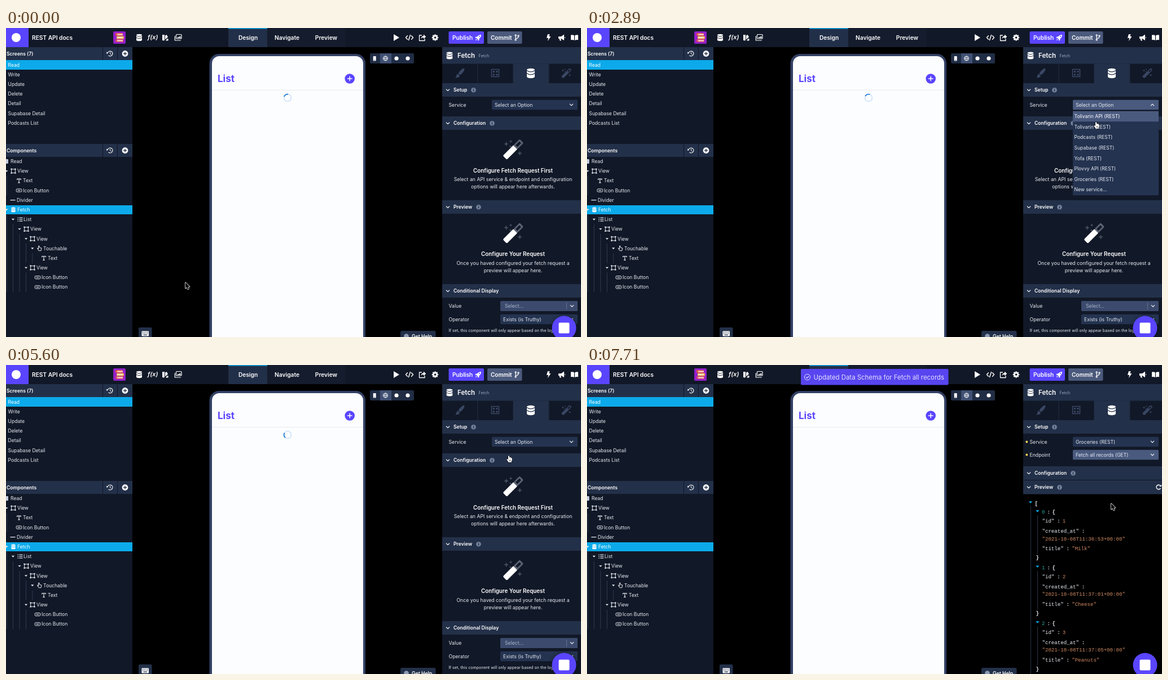
Write an HTML page with a canvas that moves like this. It is 1019 by 549 pixels and loops after 8 s.

```html
<!DOCTYPE html>
<html lang="en">
<head>
<meta charset="utf-8">
<title>REST API docs</title>
<style>
html, body { margin: 0; width: 100%; height: 100%; overflow: hidden; background: #000; }
canvas { display: block; width: 1019px; height: 549px; }
</style>
</head>
<body>
<canvas id="stage"></canvas>
<script>
const W = 1019, H = 549, LOOP = 8000;
const canvas = document.getElementById('stage');
const g = canvas.getContext('2d');
const dpr = window.devicePixelRatio || 1;
canvas.width = W * dpr;
canvas.height = H * dpr;

const C = {
  panel: '#111827', head: '#233049', field: '#243350', hover: '#4a5a7f', sky: '#0caaea',
  purple: '#5a45ff', white: '#ffffff', text: '#e8ecf3', dim: '#3a4764', info: '#73819c', line: '#0e1524'
};

// Drawing helpers
function rect(x, y, w, h, color, r = 0) {
  g.fillStyle = color;
  g.beginPath();
  g.roundRect(x, y, w, h, r);
  g.fill();
}
function box(x, y, w, h, color, lw = 1, r = 0) {
  g.strokeStyle = color;
  g.lineWidth = lw;
  g.beginPath();
  g.roundRect(x, y, w, h, r);
  g.stroke();
}
function disc(x, y, r, color) {
  g.fillStyle = color;
  g.beginPath();
  g.arc(x, y, r, 0, 7);
  g.fill();
}
function arc(x, y, r, from, to, color, lw = 1) {
  g.strokeStyle = color;
  g.lineWidth = lw;
  g.beginPath();
  g.arc(x, y, r, from, to);
  g.stroke();
}
function path(d, x, y, fill, stroke, lw = 1) {
  const p = new Path2D(d);
  g.save();
  g.translate(x, y);
  g.lineJoin = g.lineCap = 'round';
  if (stroke) { g.strokeStyle = stroke; g.lineWidth = lw; g.stroke(p); }
  if (fill) { g.fillStyle = fill; g.fill(p); }
  g.restore();
}
function text(s, x, y, size = 8.7, color = C.text, weight = 400, align = 'left', family = 'Inter, sans-serif') {
  g.font = `${weight} ${size}px ${family}`;
  g.textAlign = align;
  g.fillStyle = color;
  g.fillText(s, x, y + size * 0.36);
}
const bold = (s, x, y, size = 8.6, align) => text(s, x, y, size, C.white, 600, align);
const plus = (x, y, r, color, lw) => path(`M${-r} 0H${r}M0 ${-r}V${r}`, x, y, null, color, lw);
const chevron = (x, y, up) => path(up ? 'M-2.7 1.3L0-1.4L2.7 1.3' : 'M-2.7-1.3L0 1.4L2.7-1.3', x, y, null, C.white, 1.1);

function database(x, y, s, color, gap) {
  g.save();
  g.translate(x, y);
  g.scale(s, s);
  rect(-5, -4.5, 10, 9, color);
  g.fillStyle = color;
  for (const cy of [-4.3, 4.3]) {
    g.beginPath();
    g.ellipse(0, cy, 5, 1.9, 0, 0, 7);
    g.fill();
  }
  for (const cy of [-3.6, 0]) path('M-5 0Q0 3.4 5 0', 0, cy, null, gap, 0.9);
  g.restore();
}

function wand(x, y, s, tip, handle, star, hole) {
  g.save();
  g.translate(x, y);
  g.scale(s, s);
  for (const [sx, sy, r] of [[-12, -10, 4.4], [-4, -14.5, 3], [12, 6.5, 4.4], [-4.5, -5.5, 2.6]])
    path(`M0 ${-r}L${r * .3} ${-r * .3}L${r} 0L${r * .3} ${r * .3}L0 ${r}L${-r * .3} ${r * .3}L${-r} 0L${-r * .3} ${-r * .3}Z`, sx, sy, star);
  g.rotate(-Math.PI / 4);
  rect(-20.5, -5, 27, 10, handle, 2);
  rect(5.5, -5, 16, 10, tip, 2);
  rect(8.5, -2.2, 9.8, 4.4, hole, 0.5);
  g.restore();
}

function infoIcon(x, y) {
  disc(x, y, 4.3, C.info);
  rect(x - .6, y - .7, 1.2, 3, C.panel);
  rect(x - .6, y - 2.5, 1.2, 1.2, C.panel);
}

// Top bar
function topBar() {
  rect(0, 0, W, 34, C.panel);
  rect(0, 0, 40, 34, C.purple);
  disc(18, 17, 8, C.white);
  bold('REST API docs', 46, 17, 10.2);

  rect(190, 6, 22, 22, '#9320cc', 2);
  rect(194, 9, 13, 5, '#e2574c', 1);
  rect(196, 14.5, 13, 5, '#f0b64a', 1);
  rect(194, 20, 14, 5, '#d94a68', 1);
  for (const y of [10.5, 16, 21.5]) rect(197, y, 10, 2, '#f5e6d8');

  database(236, 17, 1, C.white, C.panel);
  text('f(x)', 251, 16.5, 10.8, C.white, 'italic 600');
  path('M-5-5H-1V4.5Q-3 6.5-5 4.5ZM0-3.5L2.5-5L5-1L0 3.5ZM1 5.5L3.5 2H5.5V5.5Z', 282, 17, C.white);
  box(301.5, 11.5, 9.5, 7.5, C.white, 1.2, 1);
  path('M-6-3V4.5H4', 305.3, 17.5, null, C.white, 1.2);
  path('M-3 3L-1 .6L.5 2L2.5-.8L4 3Z', 306, 14.8, C.white);

  rect(394, 0, 69, 34, '#222f49');
  rect(394, 0, 69, 1.6, C.sky);
  rect(463, 0, 139, 34, '#141c2d');
  bold('Design', 429, 17.5, 10.2, 'center');
  bold('Navigate', 498, 17, 10.2, 'center');
  bold('Preview', 567.5, 17, 10.2, 'center');

  path('M-4.5-6L5.5 0L-4.5 6Z', 691.5, 17, C.white);
  path('M-3.5-3.2L-6.5 0L-3.5 3.2M3.5-3.2L6.5 0L3.5 3.2M1.5-4.5L-1.5 4.5', 715, 17, null, C.white, 1.5);
  path('M-1.5-4H-5.5V5.5H4V2.5', 738, 17, null, C.white, 1.3);
  path('M-2.5 2Q-2-2.5 2-2.7V-5.5L6.3-1.5L2 2.2V-.3Q-1-.3-2.5 2Z', 738, 17, C.white);
  for (let i = 0; i < 8; i++) {
    g.save();
    g.translate(760.5, 17);
    g.rotate(i * Math.PI / 4);
    rect(-1.2, -5.7, 2.4, 3, C.white);
    g.restore();
  }
  disc(760.5, 17, 4.3, C.white);
  disc(760.5, 17, 1.8, C.panel);

  rect(784.5, 6, 62.5, 22, C.purple, 2);
  bold('Publish', 791, 17, 10.2);
  path('M5-5Q0-5-2-1.5H-4.5L-5.5 1H-3L-1 3V5.5L1.5 4.5V2Q5 0 5-5ZM-4 2.2L-2.2 4L-5 5Z', 837, 17, C.white);
  disc(839, 15, 1, C.purple);
  rect(853, 6, 61.5, 22, '#4b5a7c', 2);
  bold('Commit', 859, 17, 10);
  path('M-2.3-3V3M-2.3 2Q2.5 1.5 2.5-2', 905.5, 17, null, C.white, 1.2);
  for (const [x, y] of [[-2.3, -4], [-2.3, 4], [2.5, -3]]) {
    disc(905.5 + x, 17 + y, 1.7, C.white);
    disc(905.5 + x, 17 + y, .6, '#4b5a7c');
  }
  path('M-1.5-6H2L1-2H4L-1.5 6.3L-.3 .8H-3.5Z', 961.5, 17, C.white);
  path('M-6-2H-1L4-5.5V5L-1 2H-2L-1 5.5H-3.5L-4.5 2H-6ZM5-1.5Q7 0 5 1.5Z', 985, 17, C.white);
  path('M-6.5-4.5Q-3-5.5-.6-3.7V5Q-3 3.3-6.5 4.3ZM6.5-4.5Q3-5.5 .6-3.7V5Q3 3.3 6.5 4.3Z', 1007.5, 17, C.white);
}

// Left side
const screens = ['Read', 'Write', 'Update', 'Delete', 'Detail', 'Supabase Detail', 'Podcasts List'];
// label, text x, icon x, icon kind, arrow x
const tree = [
  ['Read', 8, 1.5, 'page'], ['View', 20, 13, 'view', 1], ['Text', 30, 23, 'text'], ['Icon Button', 30, 23, 'button'],
  ['Divider', 19, 12, 'divider'], ['Fetch', 20, 13, 'db', 1], ['List', 31, 25, 'list', 12.5], ['View', 43, 36, 'view', 24],
  ['View', 54, 47, 'view', 35.5], ['Touchable', 66, 59, 'touch', 46.8], ['Text', 74, 67, 'text'],
  ['View', 54, 47, 'view', 35.5], ['Icon Button', 63, 56, 'button'], ['Icon Button', 63, 56, 'button']
];
const ROW = 17.18, SELECTED = 5, rowY = i => 237 + i * ROW;

const treeIcons = {
  page(x, y) { rect(x - 3, y - 4, 5.5, 8, '#c3cbe0', 1); },
  view(x, y) {
    box(x - 3.3, y - 3.3, 6.6, 6.6, C.text, 1);
    for (const a of [-3.5, 3.5]) for (const b of [-3.5, 3.5]) rect(x + a - 1.1, y + b - 1.1, 2.2, 2.2, C.text);
  },
  text(x, y) { path('M-3.2-1.8V-3.3H3.2V-1.8M0-3.3V3.5M-1.3 3.6H1.3', x, y, null, C.text, 1.2); },
  button(x, y) { box(x - 4.8, y - 2.6, 9.6, 5.2, C.text, 1, 1.5); rect(x - 2.5, y - .5, 5, 1.1, C.text); },
  divider(x, y) { rect(x - 4.5, y - .6, 9, 1.3, C.text); },
  db(x, y) { database(x, y, .72, C.white, C.sky); },
  list(x, y) {
    for (const d of [-3, 0, 3]) { rect(x - 4.5, y + d - .6, 1.5, 1.3, C.text); rect(x - 1.7, y + d - .6, 6.2, 1.2, C.text); }
  },
  touch(x, y) { path('M-1.5-4V1L-3.7-.5L-1 4H3L4-.5L.2-1.5V-4Z', x, y, null, C.text, 1); }
};

function leftHeader(label, y) {
  rect(0, y, 224, 23, C.head);
  rect(171, y, 1, 23, C.panel);
  rect(197, y, 1, 23, C.panel);
  const cy = y + 11.5;
  bold(label, 1, cy);
  arc(184.5, cy, 4.4, -2.6, 2.3, C.white, 1.2);
  path('M-6.5-2.8L-3-1.7L-5.8 .8Z', 184.5, cy, C.white);
  path('M0-2.3V.3L1.8 1.3', 184.5, cy, null, C.white, 1);
  disc(211, cy, 5.4, C.white);
  plus(211, cy, 2.7, C.head, 1.3);
}

function leftPanel(cur) {
  rect(0, 34, 224, H - 34, C.panel);
  leftHeader('Screens (7)', 34);
  rect(0, 57, 224, 17, C.sky);
  screens.forEach((s, i) => text(s, 3.5, 65.6 + i * 17.2, 8.6, i ? C.text : C.white));
  leftHeader('Components', 206);

  const over = cur.x < 224 ? Math.floor((cur.y - 228.4) / ROW) : -1;
  const hovering = over >= 0 && over < tree.length;
  if (hovering) rect(0, rowY(over) - 8.6, 224, ROW, '#1d283c');
  for (const [x, from, to] of [[1.3, 1, 3], [1.3, 5, 13], [12.5, 6, 13], [24, 7, 13], [35.5, 8, 10], [46.8, 9, 10], [35.5, 11, 13]])
    rect(x - .5, rowY(from) + 8.6, 1, (to - from) * ROW, '#303b50');
  rect(0, Math.round(rowY(SELECTED)) - 8, 224, 16, C.sky);
  tree.forEach(([label, tx, ix, kind, ax], i) => {
    const y = rowY(i);
    if (ax) path('M-2.6-1.3H2.6L0 1.6Z', ax, y, C.text);
    treeIcons[kind](ix, y);
    text(label, tx, y, 8.6, i === SELECTED ? C.white : C.text);
  });
  if (hovering) for (let i = 0; i < 3; i++) disc(211 + i * 3.6, rowY(over), .9, C.white);
}

// Centre
function preview(t) {
  rect(224, 34, 549, H - 34, '#000');
  rect(360.5, 46, 276.5, 560, '#334064', 17);
  rect(365, 50, 268, 560, '#fcfdff', 13);
  text('List', 375, 90.3, 17, C.purple, 700);
  disc(609.2, 90, 8.8, C.purple);
  plus(609.2, 90, 3.8, C.white, 1.5);
  rect(365, 110, 268, 1, '#e6e9ef');
  if (t < 6500) {
    const mid = (238 + t * 0.502) * Math.PI / 180;
    arc(499, 124, 6.4, 0, 7, '#d1e4f6', 1.8);
    arc(499, 124, 6.4, mid - .72, mid + .72, '#1976d2', 1.8);
  }

  rect(645, 45, 78, 18, '#212d45', 2);
  rect(663, 45, 20, 18, '#405073');
  rect(650.7, 50, 5, 8.4, C.white, 1);
  rect(652.5, 56.6, 1.4, .9, C.head);
  arc(672.5, 54, 4, 0, 7, C.white, .9);
  path('M-4 0H4M0-4Q-3.8 0 0 4M0-4Q3.8 0 0 4', 672.5, 54, null, C.white, .8);
  disc(692, 54, 3.6, C.white);
  disc(712, 54, 3.6, C.white);

  rect(235, 532, 23.5, 24, C.head, 2);
  rect(240.5, 538.5, 12.5, 9, C.white, 1);
  for (let i = 0; i < 4; i++) for (let j = 0; j < 2; j++) rect(242 + i * 2.7, 540 + j * 2.3, 1.2, 1.2, C.head);
  rect(243.5, 544.7, 6.5, 1.2, C.head);
  rect(699, 538, 62.5, 20, C.head, 3);
  disc(709.5, 547.5, 4.3, '#8d9ab3');
  bold('Get Help', 719, 547.5, 8.7);
}

// Right side
function section(label, y, info) {
  rect(773, y, 246, 24, C.head);
  chevron(783, y + 12.3);
  bold(label, 793, y + 12.4);
  if (info) infoIcon(info, y + 12.3);
}
function select(label, x, y, color = C.field, up = false) {
  rect(x, y - 8.8, 1013 - x, 17.6, color, 1.5);
  text(label, x + 5, y, 8.65);
  chevron(1002, y, up);
}
function hint(title, lines, y) {
  wand(898.5, y, 1, '#5b6373', C.white, '#434c5c', C.panel);
  bold(title, 898.5, y + 37, 9.8, 'center');
  lines.forEach((s, i) => text(s, 898.5, y + 53 + i * 13, 8.75, C.text, 400, 'center'));
}
function conditional(y) {
  section('Conditional Display', y);
  text('Value', 784.5, y + 39);
  rect(876, y + 30, 137, 18, '#3c4b6d', 1.5);
  text('Select...', 884, y + 39, 8.7, '#aab5c9');
  rect(993, y + 33, 1, 12, '#64738f');
  chevron(1003, y + 39);
  text('Operator', 784.5, y + 62.5);
  select('Exists (is Truthy)', 876, y + 62.5);
  text('If set, this component will only appear based on the logic above.', 784.5, y + 82.5, 7.1);
}

function menu(items, y, active, color, weight) {
  rect(861, y, 152, items.length * 18.6 + .6, C.field);
  items.forEach((s, i) => {
    const on = i === active;
    if (on) rect(861, y + i * 18.6, 152, 18.4, color);
    text(s, 863.5, y + 9.3 + i * 18.6, 8.6, on ? C.white : C.text, on ? weight : 400);
  });
}

function loader(x, y, t) {
  const step = Math.floor(t / 100);
  for (let i = 0; i < 8; i++) {
    const a = i * Math.PI / 4, c = Math.cos(a), s = Math.sin(a);
    g.globalAlpha = .3 + .7 * (((i - step) % 8 + 8) % 8) / 7;
    path(`M${c * 4} ${s * 4}L${c * 7.3} ${s * 7.3}`, x, y, null, C.white, 1.3);
  }
  g.globalAlpha = 1;
}

const records = [['11:36:53', 'Milk'], ['11:37:01', 'Cheese'], ['11:37:05', 'Peanuts']];
function json() {
  const orange = '#d18a62', teal = '#2aa79b', mono = '"Liberation Mono", monospace';
  const code = (s, x, y, color = C.text, weight = 400) => text(s, x, y, 9.1, color, weight, 'left', mono);
  const pair = (key, value, y, color) => {
    code(key, 806.5, y);
    const end = 806.5 + g.measureText(key).width;
    code(':', end + 4.8, y, C.text, 700);
    code(value, end + 14.5, y, color);
  };
  rect(773, 230, 246, H - 230, '#000');
  rect(785.8, 250, 1, 300, '#2b374c');
  path('M-3.2-1.6H3.2L0 1.9Z', 786, 243.8, C.sky);
  code('[', 793.5, 246, C.text, 700);
  records.forEach(([time, title], i) => {
    const y = 261 + i * 98.7;
    rect(798, y + 6, 1, 69, '#2b374c');
    path('M-3.2-1.6H3.2L0 1.9Z', 798.3, y - 1.5, C.sky);
    code(i, 806, y, teal);
    code(':', 815.5, y, C.text, 700);
    code('{', 824.5, y, C.text, 700);
    pair('"id"', i + 1, y + 16, orange);
    pair('"created_at"', '', y + 34);
    code(`"2021-10-08T${time}+00:00"`, 806.5, y + 47.5, orange);
    pair('"title"', `"${title}"`, y + 65, orange);
    code('}', 795.5, y + 81, C.text, 700);
  });
}

const services = ['Tolivarin API', 'Tolivarin', 'Podcasts', 'Supabase', 'Yofa', 'Plovvy API', 'Groceries']
  .map(s => s + ' (REST)').concat('New service...');

function rightPanel(t, cur) {
  rect(773, 34, 246, H - 34, C.panel);
  rect(773, 34, 246, 30, C.head);
  database(786, 49, 1.05, C.white, C.head);
  bold('Fetch', 800, 49, 11.6);
  text('Fetch', 837.5, 49, 7.2, '#9aa7bf');
  rect(773, 63.5, 246, 34.5, C.panel);
  for (const x of [835.5, 898.5, 961.5]) rect(x, 64, 1, 34, C.head);
  rect(899, 63.5, 62.5, 34.5, C.head);
  path('M8-8.5Q10-6.5 4 .5L.5 3L-2.5 0L0-3.5Q6-9.5 8-8.5ZM-3.3 1L0 4.3Q-1 9-8.5 7.5Q-5.5 6.5-5.8 4Q-5.5 1.5-3.3 1Z', 804, 80.5, C.dim);
  box(860.5, 73.5, 13, 13, C.dim, 1.6);
  for (const [x, y] of [[863, 76], [868.5, 76], [868.5, 81.5], [863, 81.5]]) rect(x, y, 3, 3, C.dim);
  database(930, 80.5, 1.4, C.white, C.head);
  wand(993, 80.5, .5, C.dim, C.dim, C.dim, C.panel);

  const chosen = t >= 5720;
  const serviceOpen = t >= 2480 && t < 4650;
  section('Setup', 98, 828.5);
  text('Service', 784.5, 136.5);
  select(chosen ? 'Groceries (REST)' : 'Select an Option', 861, 136.5, serviceOpen ? C.hover : C.field, serviceOpen);

  if (!chosen) {
    section('Configuration', 157, 861.5);
    hint('Configure Fetch Request First', ['Select an API service & endpoint and configuration', 'options will appear here afterwards.'], 216);
    section('Preview', 306, 837.5);
    hint('Configure Your Request', ['Once you haved configured your fetch request a', 'preview will appear here.'], 364.8);
    conditional(455);
    if (serviceOpen) menu(services, 147.8, Math.max(0, Math.floor((cur.y - 149) / 18.6)), C.hover, 400);
  } else {
    const endpointOpen = t >= 6300 && t < 6950;
    disc(779.3, 136.5, 2, '#f7d154');
    disc(779.3, 159.5, 2, '#f7d154');
    text('Endpoint', 784.5, 159.5);
    select('Fetch all records (GET)', 861, 159.5, C.hover, endpointOpen);
    section('Configuration', 180, 861.5);
    section('Preview', 205, 837.5);
    rect(773, 204, 246, 1, C.line);
    arc(1013, 217, 3.9, .5, 5.4, C.white, 1.5);
    path('M1.2-1L4.8-1L4.8-4.7Z', 1013, 217, C.white);
    if (t < 7100) {
      loader(898, 250, t);
      conditional(259);
      section('Help', 353);
      ["Don't know where to go from here? Add a", 'component under Fetch, like Text and then', 'map your data to it.']
        .forEach((s, i) => bold(s, 898.5, 397 + i * 15, 9.8, 'center'));
    } else json();
    if (endpointOpen) menu(['Fetch all records (GET)', 'New endpoint...'], 171, 0, C.sky, 600);
  }

  g.save();
  g.shadowColor = 'rgba(0,0,0,.35)';
  g.shadowBlur = 7;
  disc(989, 533, 21.5, C.purple);
  g.restore();
  rect(979.5, 523.5, 19, 19, C.white, 2);
}

function toast(t) {
  const alpha = Math.min(1, Math.max(0, (t - 6500) / 280));
  if (!alpha) return;
  g.globalAlpha = alpha * .97;
  rect(379, 7, 261.5, 28.5, '#5a47f6', 2);
  g.globalAlpha = alpha;
  arc(390.5, 21.5, 5.2, 0, 7, '#e4e2ff', 1);
  path('M-2.2 .1L-.5 1.8L2.5-1.7', 390.5, 21.5, null, '#e4e2ff', 1.1);
  text('Updated Data Schema for Fetch all records', 401.5, 21.8, 11.4, '#e4e2ff');
  g.globalAlpha = 1;
}

// Pointer: time, x, y
const route = [
  [0, 318, 452], [80, 318, 452], [880, 140, 342], [1080, 124, 327], [1790, 124, 327], [2450, 905, 140],
  [2600, 905, 142], [2890, 902, 167], [3350, 903, 214], [3700, 904, 245], [4160, 905, 269], [4680, 905, 269],
  [5020, 891, 161], [5850, 891, 161], [6300, 905, 161], [6900, 905, 161], [7250, 960, 200], [7540, 989, 232],
  [7700, 929, 246], [LOOP, 929, 246]
];
function pointerAt(t) {
  const i = Math.max(1, route.findIndex(k => k[0] > t));
  const [t0, x0, y0] = route[i - 1], [t1, x1, y1] = route[i];
  const u = (t - t0) / (t1 - t0), e = u * u * (3 - 2 * u);
  return { x: x0 + (x1 - x0) * e, y: y0 + (y1 - y0) * e };
}
function pointer({ x, y }, t) {
  if (x < 224) {
    const d = 'M0-5.8L2.3-3.2H.8V-.8H3.2V-2.3L5.8 0L3.2 2.3V.8H.8V3.2H2.3L0 5.8L-2.3 3.2H-.8V.8H-3.2V2.3L-5.8 0L-3.2-2.3V-.8H-.8V-3.2H-2.3Z';
    path(d, x, y, '#000', '#fff', 1.8);
  } else if (t > 2380 && t < 7150 && x > 855) {
    path('M-1 .8Q0-.7 1 .8V4.2Q2-.0 2.8 4.4Q4-.0 4.5 4.8Q6.3 4 6 6.8Q6.2 9 4.8 10V11.8H-.7Q-1.2 10-3.5 7.2Q-4.2 5.2-1 6.8Z', x, y, '#fff', '#000', 1.1);
    path('M1.2 7.4V9.8M3.2 7.4V9.8', x, y, null, '#000', .6);
  } else {
    path('M0 0V10.6L2.4 8.4L4.2 12.4L6 11.6L4.3 7.7H7.6Z', x, y, '#000', '#fff', 1.5);
  }
}

function draw(t) {
  g.setTransform(dpr, 0, 0, dpr, 0, 0);
  const cur = pointerAt(t);
  preview(t);
  leftPanel(cur);
  rightPanel(t, cur);
  topBar();
  toast(t);
  pointer(cur, t);
}

const start = performance.now();
function tick() {
  draw((performance.now() - start) % LOOP);
  requestAnimationFrame(tick);
}
tick();
</script>
</body>
</html>
```
